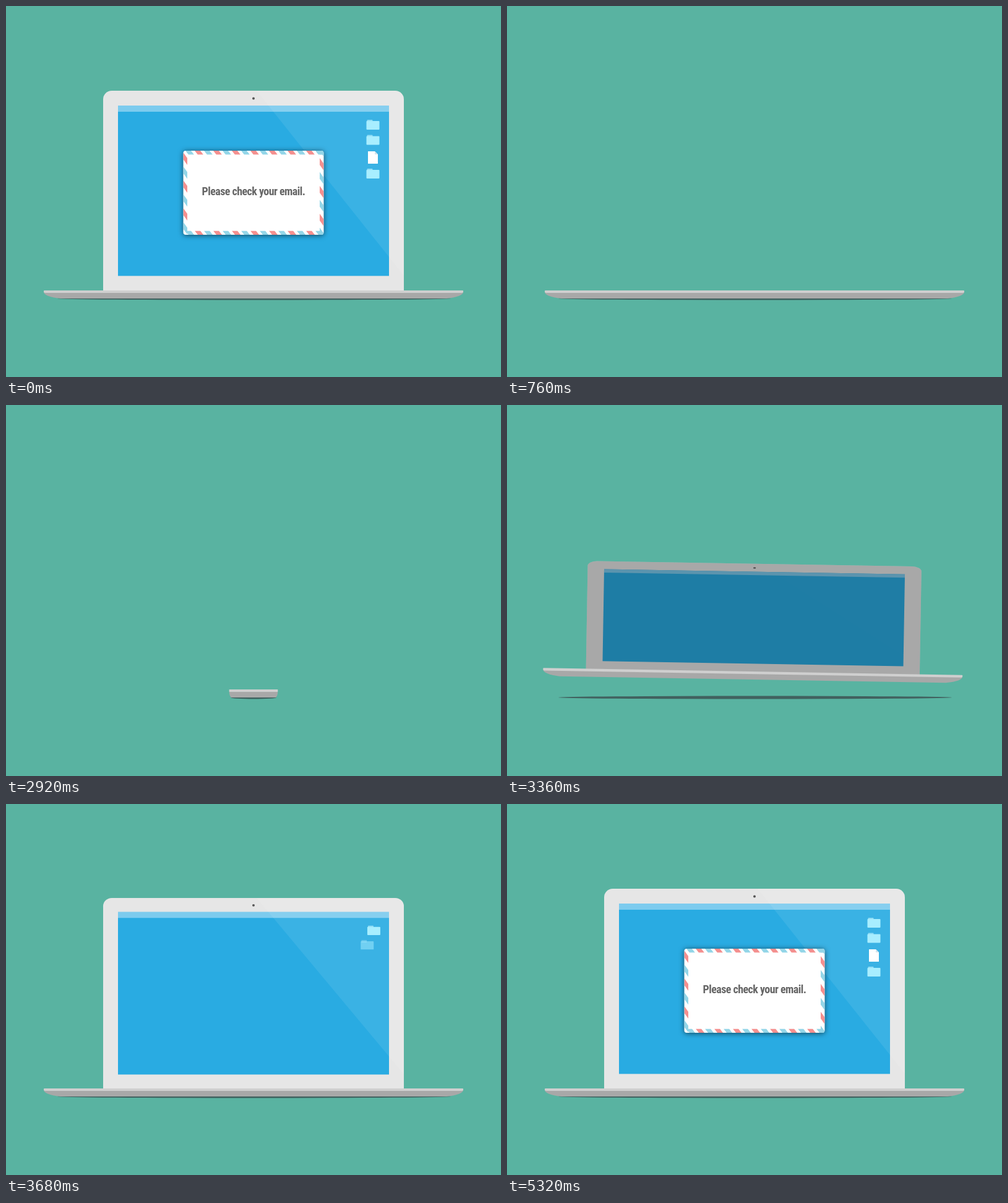
Animation of 800 by 600 pixels, one loop 6000 ms. Source, as an HTML page with a canvas:

```html
<!DOCTYPE html>
<html lang="en">
<head>
<meta charset="utf-8">
<title>Check your email</title>
<style>
  html, body { margin: 0; width: 100%; height: 100%; overflow: hidden; background: #59b3a1; }
  canvas { display: block; }
</style>
</head>
<body>
<canvas id="stage" width="800" height="600"></canvas>
<script>
const ctx = document.getElementById('stage').getContext('2d');
const LOOP = 6000, STEP = 40;

const clamp = x => Math.min(1, Math.max(0, x));
const smooth = u => u * u * (3 - 2 * u);
const power = n => u => u ** n;

// Value at time t of a track of [time, value, easing towards this key].
function track(t, keys) {
  if (t <= keys[0][0]) return keys[0][1];
  for (let i = 1; i < keys.length; i++) {
    const [t0, v0] = keys[i - 1], [t1, v1, ease = smooth] = keys[i];
    if (t < t1) return v0 + (v1 - v0) * ease((t - t0) / (t1 - t0));
  }
  return keys[keys.length - 1][1];
}

const baseWidth = [[1400, 1], [1600, 1.115], [1760, 0, power(2.5)],
  [2880, 0], [3080, 1.115], [3240, 1]];
const lidHeight = [[240, 1], [520, 1.071], [760, 0, power(2.5)],
  [3268, 0], [3462, 1.17], [3660, .95], [3800, 1.02], [3960, .993], [4160, 1]];
const lidTilt = [[520, 0], [760, 1, power(1.9)], [3257, 1], [3457, 0]];
const lift = [[3240, 0], [3420, 39], [3560, 0]];
const roll = [[3240, 0], [3350, 1], [3515, -1.8], [3570, 0]];
const mailScale = [[4130, 0], [4282, 1.12], [4420, .98], [4560, 1]];
const mailRoll = [[4130, 6], [4290, -1], [4420, 0]];

function at(x, y, draw, { sx = 1, sy = sx, angle = 0 } = {}) {
  ctx.save();
  ctx.translate(x, y);
  ctx.rotate(angle * Math.PI / 180);
  ctx.scale(sx, sy);
  ctx.translate(-x, -y);
  draw();
  ctx.restore();
}

function rect(x, y, w, h, color, radius = 0) {
  ctx.fillStyle = color;
  ctx.beginPath();
  ctx.roundRect(x, y, w, h, radius);
  ctx.fill();
}

function poly(color, ...points) {
  ctx.fillStyle = color;
  ctx.beginPath();
  points.forEach(p => ctx.lineTo(...p));
  ctx.fill();
}

function ellipse(x, y, rx, ry, color) {
  ctx.fillStyle = color;
  ctx.beginPath();
  ctx.ellipse(x, y, rx, ry, 0, 0, 7);
  ctx.fill();
}

function drawBase() {
  ctx.fillStyle = '#a8a8a8';
  ctx.beginPath();
  ctx.moveTo(61, 462);
  ctx.lineTo(739, 462);
  ctx.quadraticCurveTo(739, 470, 712, 473);
  ctx.lineTo(88, 473);
  ctx.quadraticCurveTo(61, 470, 61, 462);
  ctx.fill();
  rect(61, 460, 678, 4, '#cfcfcf', [1, 1, 2, 2]);
}

function drawFolder(x, y) {
  rect(x + 1, y - 1, 9, 4, '#8fdcf5', 1);
  rect(x, y + 1, 21, 14, '#a8eeff', 1);
}

function drawPage(x, y) {
  poly('#fff', [x, y], [x + 11, y], [x + 16, y + 5], [x + 16, y + 20], [x, y + 20]);
  poly('#d5e4ec', [x + 11, y], [x + 16, y + 5], [x + 11, y + 5]);
}

function drawIcons(t) {
  [185, 209.5, 235, 264].forEach((y, i) => {
    const start = 3540 + 80 * i;
    const slide = track(t, [[start, -20], [start + 120, 1.5], [start + 280, 0]]);
    ctx.globalAlpha = clamp((t - start) / 120);
    if (i === 2) drawPage(585 + slide, y);
    else drawFolder(582.5 + slide, y);
  });
  ctx.globalAlpha = 1;
}

function drawStripes() {
  for (let i = -1; i < 16; i++) {
    const color = i % 2 ? '#94d6e8' : '#f5908f';
    const x = 312 + 15 * i;
    for (const y of [234, 363.5])
      poly(color, [x - 7, y], [x + 2, y], [x + 7, y + 6.5], [x - 2, y + 6.5]);
    for (const [left, first] of [[286.5, 247], [507, 256]]) {
      const y = first + 22.5 * i;
      poly(color, [left, y - 10], [left + 6.5, y - 1], [left + 6.5, y + 10], [left, y + 1]);
    }
  }
}

function drawMail(textAlpha) {
  ctx.shadowColor = 'rgba(0,0,0,.6)';
  ctx.shadowBlur = 9;
  ctx.shadowOffsetY = 1;
  rect(286.5, 234, 227, 136, '#fff', 4);
  ctx.shadowColor = 'transparent';
  ctx.save();
  ctx.clip();
  drawStripes();
  rect(293, 240.5, 214, 123, '#fff');
  ctx.restore();
  drawText('Please check your email.', 400, 306, 167, textAlpha);
}

// Picks the font size that gives the wanted line length.
function drawText(text, x, y, length, alpha) {
  const setFont = size => {
    ctx.font = `condensed bold ${size}px "Roboto Condensed", Roboto, sans-serif`;
    ctx.letterSpacing = `${-.03 * size}px`;
  };
  setFont(20);
  setFont(20 * length / ctx.measureText(text).width);
  ctx.textAlign = 'center';
  ctx.globalAlpha = alpha;
  ctx.fillStyle = '#666';
  ctx.fillText(text, x, y);
  ctx.globalAlpha = 1;
}

function drawLid(t, tilt) {
  const settled = t < 1500 ? t + LOOP : t;
  const lidShape = color => rect(157, 137, 486, 324, color, [14, 14, 0, 0]);
  lidShape('#e6e6e6');
  ellipse(400, 149.5, 2, 2, '#555');
  rect(181, 161, 438, 275.5, '#29abe2');
  rect(181, 161, 438, 10, '#7dcbee');

  ctx.save();
  ctx.beginPath();
  ctx.roundRect(157, 137, 486, 324, [14, 14, 0, 0]);
  ctx.clip();
  poly(`rgba(255,255,255,${.08 * clamp(1 - 2 * tilt)})`, [405, 137], [643, 137], [643, 436]);
  ctx.restore();

  drawIcons(settled);
  const scale = track(settled, mailScale);
  if (scale > 0)
    at(400, 302, () => drawMail(clamp((settled - 4800) / 520)),
      { sx: scale, angle: track(settled, mailRoll) });
  if (tilt > 0) lidShape(`rgba(0,0,0,${.57 * tilt})`);
}

function draw(t) {
  rect(0, 0, 800, 600, '#59b3a1');
  const width = track(t, baseWidth);
  if (width <= 0) return;
  const height = track(t, lidHeight), tilt = track(t, lidTilt);

  at(400, 460, () => ellipse(401, 473, 318, 2.5, '#41615f'), { sx: width, sy: 1 });
  ctx.save();
  ctx.translate(0, -track(t, lift));
  at(400, 300, () => {
    if (height > 0)
      at(400, 460, () => drawLid(t, tilt), { sx: 1 + .23 * tilt, sy: height });
    at(400, 460, drawBase, { sx: width, sy: 1 });
  }, { angle: track(t, roll) });
  ctx.restore();
}

const begin = performance.now();
function tick() {
  const t = (performance.now() - begin) % LOOP;
  draw(Math.floor(t / STEP) * STEP);
  requestAnimationFrame(tick);
}
tick();
</script>
</body>
</html>
```
